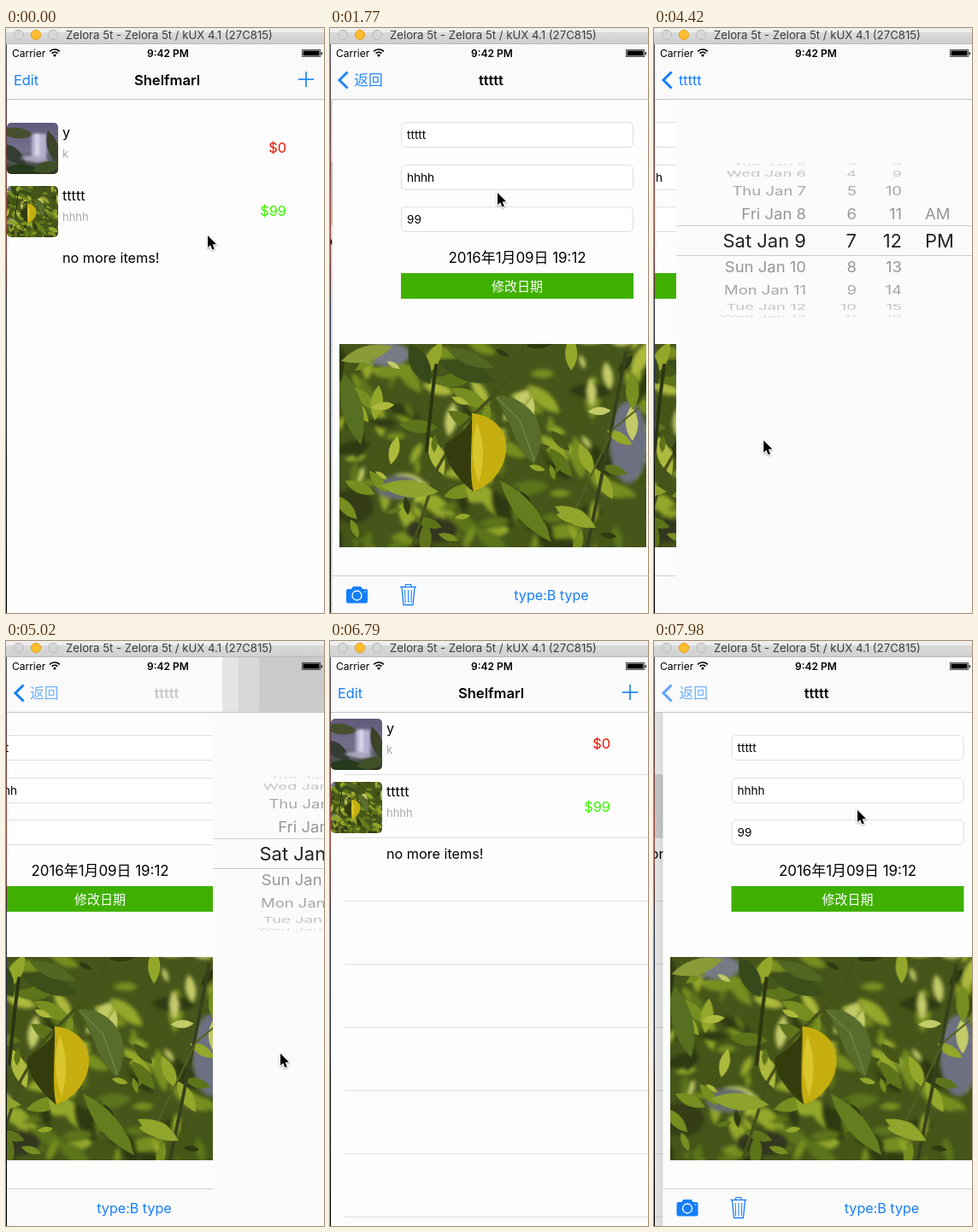
These frames come from a looping animation (372 px wide and 685 px high, 8 s). An HTML page with a canvas:

```html
<!DOCTYPE html>
<html lang="en">
<head>
<meta charset="utf-8">
<title>Item list demo</title>
<style>
html, body { margin: 0; width: 100%; height: 100%; overflow: hidden; background: #fdfdfd; }
canvas { display: block; width: 372px; height: 685px; }
</style>
</head>
<body>
<canvas id="stage" width="372" height="685"></canvas>
<script>
const W = 372, H = 685, LOOP = 8000, SPAN = 371, NAV = 84;
const BLUE = '#157efb', PAPER = '#fdfdfd', LINE = '#dedede';
const FACE = 'Inter, "Noto Sans CJK SC", "Noto Sans CJK JP", "Noto Sans CJK", sans-serif';
const c = document.getElementById('stage').getContext('2d');

// Motion tracks: [step, value, ...], linear in between
const DETAIL = [[9, 371], [10, 110], [11, 18], [12, 2], [13, 0], [42, 0], [43, 50],
  [44, 170], [45, 320], [46, 371], [52, 371], [53, 90], [54, 9.5]];
const PICKER = [[21, 371], [22, 239], [23, 80], [24, 18], [25, 3], [26, 0], [29, 0],
  [31, 50], [34, 241], [35, 241], [36, 290], [37, 345], [38, 366], [39, 371]];
const UNDER = [[21, 0], [22, -41], [23, -87], [24, -106], [25, -111], [29, -111],
  [34, -107], [35, -107], [36, -80], [37, -30], [38, -6], [39, 0]];
const BOUNCE = [[0, 20], [1, 16], [2, 6], [3, 2], [4, 0]];
const SHADE = [[22, 317], [24, 372], [30, 372], [34, 253], [35, 253], [37, 372]];
const POINTER = [[1, 236, 243], [6, 200, 196], [10, 200, 196], [12, 196, 193], [13, 196, 193],
  [17, 268, 299], [18, 266, 302], [22, 266, 302], [27, 80, 483], [29, 80, 483], [34, 321, 483],
  [35, 321, 483], [36, 335, 483], [40, 110, 475], [42, 110, 475], [46, 400, 476],
  [48, 385, 260], [51, 245, 202], [54, 238, 198]];

const clamp = v => Math.max(0, Math.min(1, v));

function at(track, k, i = 1) {
  let a = track[0];
  for (const b of track) {
    if (k <= b[0]) return b === a ? b[i] : a[i] + (b[i] - a[i]) * (k - a[0]) / (b[0] - a[0]);
    a = b;
  }
  return a[i];
}

function rect(x, y, w, h, color) {
  c.fillStyle = color;
  c.fillRect(x, y, w, h);
}

function text(str, x, y, size, color = '#000', align = 'left', weight = 400) {
  c.font = `${weight} ${size}px ${FACE}`;
  c.textAlign = align;
  c.fillStyle = color;
  c.fillText(str, x, y);
}

function stroke(points, color, width, g = c) {
  g.beginPath();
  points.forEach(([x, y], i) => i ? g.lineTo(x, y) : g.moveTo(x, y));
  g.strokeStyle = color;
  g.lineWidth = width;
  g.stroke();
}

function disc(x, y, r, fill, edge) {
  c.beginPath();
  c.arc(x, y, r, 0, 7);
  if (fill) { c.fillStyle = fill; c.fill(); }
  if (edge) { c.strokeStyle = edge; c.stroke(); }
}

function faded(alpha, draw) {
  if (alpha <= 0) return;
  c.save();
  c.globalAlpha *= clamp(alpha);
  draw();
  c.restore();
}

function sheet(w, h) {
  const s = document.createElement('canvas');
  s.width = w;
  s.height = h;
  return s;
}

function leaf(g, x1, y1, x2, y2, bulge, color) {
  const mx = (x1 + x2) / 2, my = (y1 + y2) / 2;
  const len = Math.hypot(x2 - x1, y2 - y1) || 1;
  const nx = -(y2 - y1) / len * bulge, ny = (x2 - x1) / len * bulge;
  g.beginPath();
  g.moveTo(x1, y1);
  g.quadraticCurveTo(mx + nx, my + ny, x2, y2);
  g.quadraticCurveTo(mx - nx, my - ny, x1, y1);
  g.fillStyle = color;
  g.fill();
}

function plantPicture() {
  const s = sheet(359, 238), g = s.getContext('2d');
  let seed = 41;
  const rnd = () => (seed = seed * 16807 % 2147483647) / 2147483647;
  const tones = ['#2f3a12', '#455617', '#5d741b', '#778e20', '#94a72b', '#adb93c', '#c3ca68'];
  g.fillStyle = '#46561a';
  g.fillRect(0, 0, 359, 238);
  const blob = (x, y, rx, ry, color) => {
    g.beginPath();
    g.ellipse(x, y, rx, ry, 0, 0, 7);
    g.fillStyle = color;
    g.fill();
  };
  const scatter = (n, size) => {
    for (let i = 0; i < n; i++) {
      const x = rnd() * 380 - 10, y = rnd() * 250 - 10;
      const a = rnd() * 2.6 - 0.3, len = size * (0.5 + rnd());
      const light = y > 165 ? 5 : 7;
      leaf(g, x, y, x + Math.cos(a) * len, y + Math.sin(a) * len, len * 0.35, tones[rnd() * light | 0]);
    }
  };
  g.filter = 'blur(2px)';
  scatter(170, 36);
  blob(55, 12, 28, 14, '#777b86');
  blob(338, 115, 22, 48, '#6c7080');
  blob(68, 168, 26, 14, '#666b70');
  blob(108, 218, 30, 15, '#33371f');
  blob(15, 190, 25, 20, '#343d16');
  g.filter = 'none';
  scatter(75, 32);

  g.lineCap = 'round';
  stroke([[215, 3], [205, 32], [180, 60], [142, 98], [115, 145], [85, 238]], '#46501a', 3.5, g);
  stroke([[113, 25], [108, 65], [102, 125]], '#2c3512', 4, g);
  stroke([[335, 10], [319, 95], [290, 238]], '#38401c', 4, g);
  stroke([[270, 205], [320, 100], [350, 75]], '#536021', 2, g);

  leaf(g, 5, 34, 25, 118, 24, '#566f20');
  leaf(g, 2, 20, 62, 3, 18, '#8b9b38');
  leaf(g, 82, 0, 106, 47, 22, '#36491a');
  leaf(g, 116, 20, 182, 44, 22, '#3c4f1a');
  leaf(g, 125, 5, 180, 28, 16, '#516722');
  leaf(g, 48, 166, 116, 173, 20, '#8da32d');
  leaf(g, 188, 160, 248, 232, 22, '#647d1e');
  leaf(g, 252, 190, 300, 215, 18, '#91a52d');

  g.beginPath();
  g.moveTo(182, 62);
  g.bezierCurveTo(205, 55, 255, 85, 228, 140);
  g.bezierCurveTo(205, 125, 202, 88, 182, 62);
  g.fillStyle = '#586d2b';
  g.fill();
  stroke([[184, 63], [211, 89], [228, 137]], '#83905a', 1, g);

  g.beginPath();
  g.moveTo(157, 82);
  g.bezierCurveTo(145, 113, 122, 110, 122, 124);
  g.bezierCurveTo(128, 146, 144, 163, 157, 173);
  g.fillStyle = '#343c0e';
  g.fill();
  g.beginPath();
  g.moveTo(155, 81);
  g.bezierCurveTo(188, 85, 201, 110, 193, 136);
  g.bezierCurveTo(186, 157, 170, 168, 157, 173);
  g.bezierCurveTo(151, 150, 156, 110, 155, 81);
  g.fillStyle = '#c6ae10';
  g.fill();
  leaf(g, 161, 91, 163, 163, 12, '#d9c62c');
  return s;
}

function waterfallPicture() {
  const s = sheet(60, 60), g = s.getContext('2d');
  const sky = g.createLinearGradient(0, 0, 0, 60);
  sky.addColorStop(0, '#62597b');
  sky.addColorStop(0.55, '#75718a');
  sky.addColorStop(1, '#28361c');
  g.fillStyle = sky;
  g.fillRect(0, 0, 60, 60);
  leaf(g, -8, 10, 32, 14, 13, '#46502f');
  leaf(g, -10, 25, 22, 48, 16, '#343c33');
  g.filter = 'blur(1.5px)';
  g.fillStyle = '#b5b0cd';
  g.fillRect(29, 13, 17, 30);
  g.fillStyle = '#d9d6e8';
  g.fillRect(33, 13, 5, 32);
  leaf(g, 15, 41, 50, 44, 7, '#aaa6bf');
  g.filter = 'none';
  leaf(g, 48, 9, 60, 49, 13, '#3b4329');
  leaf(g, -5, 56, 42, 59, 19, '#26391b');
  leaf(g, 30, 56, 64, 48, 13, '#405026');
  return s;
}

const plant = plantPicture(), falls = waterfallPicture();

function thumb(img, sx, size, y) {
  c.save();
  c.beginPath();
  c.roundRect(1, y, 60, 60, 5);
  c.clip();
  c.drawImage(img, sx, 0, size, size, 1, y, 60, 60);
  c.restore();
}

function drawList(k, shift) {
  const dy = Math.round(at(BOUNCE, k));
  c.save();
  c.translate(shift, dy);
  rect(0, NAV - dy, 500, H, PAPER);
  const lit = k >= 8 && k < 46 ? clamp((46 - k) / 4) : k >= 52 ? 1 : 0;
  faded(lit, () => rect(0, 157, 500, 74, '#d9d9d9'));
  if (k > 0) for (let y = 156; y < H; y += 74) rect(17, y, 400, 1, LINE);
  const row = (y, name, note, price, color) => {
    text(name, 66, y + 25, 16.2);
    text(note, 66, y + 49, 13, '#aaa');
    text(price, 328, y + 43, 16.4, color, 'right');
  };
  thumb(falls, 0, 60, 91);
  thumb(plant, 60, 238, 165);
  row(83, 'y', 'k', '$0', '#f01000');
  row(157, 'ttttt', 'hhhh', '$99', '#3cf500');
  text('no more items!', 66, 255, 16.2);
  c.restore();
}

function drawCamera() {
  c.fillStyle = BLUE;
  c.beginPath();
  c.roundRect(17, 657, 25, 16.5, 2);
  c.fill();
  c.beginPath();
  c.moveTo(22, 658);
  c.lineTo(25, 654);
  c.lineTo(34, 654);
  c.lineTo(37, 658);
  c.fill();
  c.lineWidth = 1.3;
  disc(29.5, 664.5, 5.5, null, '#fff');
  disc(39, 660, 0.8, '#fff');
}

function drawTrash() {
  stroke([[80, 654.5], [99, 654.5]], BLUE, 1.3);
  stroke([[86, 654], [86.5, 651.5], [92.5, 651.5], [93, 654]], BLUE, 1.2);
  stroke([[82, 655], [84, 675.5], [95, 675.5], [97, 655]], BLUE, 1.3);
  for (const d of [-3.5, 0, 3.5]) stroke([[89.5 + d * 1.1, 658], [89.5 + d, 673]], BLUE, 1);
}

function drawDetail(k, shift) {
  c.save();
  c.translate(shift, 0);
  rect(1, NAV, 490, H, PAPER);
  [[110, 'ttttt'], [160, 'hhhh'], [209, '99']].forEach(([y, value]) => {
    c.beginPath();
    c.roundRect(81.5, y + 0.5, 271, 29, 5);
    c.fillStyle = '#fff';
    c.fill();
    c.strokeStyle = LINE;
    c.lineWidth = 1;
    c.stroke();
    text(value, 88, y + 20, 13.6);
  });
  text('2016年1月09日 19:12', 217, 275, 16.9, '#000', 'center');
  rect(81, 287, 272, 30, '#40b000');
  const pressed = k >= 20 && k < 30;
  text('修改日期', 217, 308, 15, pressed ? '#79c150' : '#fff', 'center');
  c.drawImage(plant, 9, 370);
  rect(1, 641, 490, 44, '#fbfbfb');
  rect(1, 641, 490, 1, '#cfcfcf');
  drawCamera();
  drawTrash();
  text('type:B type', 257, 670, 16.1, BLUE, 'center');
  c.restore();
}

function wheel(x, align, label) {
  const tints = ['#222', '#969696', '#a6a6a6', '#c4c4c4', '#dcdcdc'];
  for (let i = -4; i <= 4; i++) {
    const angle = i * 0.35;
    c.save();
    c.translate(x, 249 + 90 * Math.sin(angle));
    c.scale(1, Math.cos(angle));
    const size = i ? 18.5 : 22;
    text(label(i), 0, size * 0.36, size, tints[Math.abs(i)], align);
    c.restore();
  }
}

function drawPicker(shift) {
  const days = ['Sun', 'Mon', 'Tue', 'Wed', 'Thu', 'Fri', 'Sat'];
  c.save();
  c.translate(shift, 0);
  rect(1, NAV, 490, H, '#fbfbfb');
  wheel(153, 'right', i => days[(i + 13) % 7] + ' Jan ' + (9 + i));
  wheel(212, 'right', i => String(7 + i));
  wheel(265, 'right', i => String(12 + i));
  wheel(292, 'left', i => i === 0 ? 'PM' : i === -1 ? 'AM' : '');
  rect(1, 231, 490, 1, '#cdcdcd');
  rect(1, 266, 490, 1, '#cdcdcd');
  c.restore();
}

function edgeShadow(x, depth) {
  if (x <= 1 || x >= W) return;
  const g = c.createLinearGradient(x - 9, 0, x, 0);
  g.addColorStop(0, 'rgba(0,0,0,0)');
  g.addColorStop(1, `rgba(0,0,0,${depth})`);
  rect(x - 9, NAV, 9, H, g);
}

function chevron() {
  stroke([[20.5, 51.5], [11, 61], [20.5, 70.5]], BLUE, 3);
}

function drawNav(k, off, pick) {
  rect(1, 19, W, 64, '#fafafa');
  const shade = at(SHADE, k);
  if (k >= 22 && k < 38 && shade < W) {
    rect(shade, 19, W, 64, '#e4e4e4');
    rect(shade + 19, 19, W, 64, '#d8d8d8');
    rect(shade + 43, 19, W, 64, '#cacaca');
  }
  rect(1, 83, W, 1, '#c4c4c4');

  const p = 1 - off / SPAN, q = 1 - pick / SPAN, back = k >= 30;
  faded(1 - p * 1.6, () => {
    text('Edit', 9, 67, 16.3, BLUE);
    text('Shelfmarl', 188.5 - p * 100, 67, 16.6, '#000', 'center', 600);
    rect(342, 59.3, 18, 1.6, BLUE);
    rect(350.2, 51, 1.6, 18, BLUE);
  });
  if (p <= 0) return;
  if (q <= 0) {
    faded(1 - off / 24, () => text('返回', 28 + off * 0.15, 67, 16.8, BLUE));
    faded(1 - off / 30, chevron);
    faded(1 - off / 200, () => text('ttttt', 188 + off * 0.22, 67, 16.6, '#000', 'center', 600));
    return;
  }
  chevron();
  if (back) {
    const r = clamp((k - 30) / 4);
    const done = clamp((k - 35) / 4);
    faded(0.6 * r + 0.4 * done, () => text('返回', 28, 67, 16.8, BLUE));
    faded(0.2 * r + 0.8 * done, () => text('ttttt', 188, 67, 16.6, '#000', 'center', 600));
    faded(1 - r * 1.4, () => text('ttttt', 29, 67, 16.3, BLUE));
  } else {
    faded(1 - q * 1.8, () => text('返回', 28 - q * 42, 67, 16.8, BLUE));
    const x = 188 - q * 143 + 25 * clamp(q * 2 - 1) * 0;
    faded(1 - q * 1.35, () => text('ttttt', x, 67, 16.6, '#22355c', 'center', 600));
    faded(q * 1.1 - 0.1, () => text('ttttt', x, 67, 16.3, BLUE, 'center'));
  }
}

function drawStatus() {
  text('Carrier', 7, 33.5, 12);
  c.lineWidth = 1.7;
  for (const r of [4.6, 8]) {
    c.beginPath();
    c.arc(57, 33, r, -Math.PI * 0.76, -Math.PI * 0.24);
    c.strokeStyle = '#000';
    c.stroke();
  }
  disc(57, 32, 1.6, '#000');
  text('9:42 PM', 189.5, 33.5, 12, '#000', 'center', 600);
  c.lineWidth = 0.8;
  c.strokeStyle = '#333';
  c.strokeRect(346.4, 25.4, 21.2, 8.2);
  rect(347.5, 26.5, 19, 6, '#000');
  rect(368.5, 28, 1.5, 3.5, '#222');
}

function drawFrame() {
  const bar = c.createLinearGradient(0, 0, 0, 19);
  bar.addColorStop(0, '#dedede');
  bar.addColorStop(1, '#cfcfcf');
  rect(0, 0, W, 19, bar);
  rect(0, 0, W, 5, '#eeeeee');
  rect(0, 18, W, 1, '#b9b9b9');
  c.lineWidth = 1;
  disc(15, 8, 5.6, '#d6d6d6', '#b9b9b9');
  disc(35, 8, 5.6, '#fdbd2e', '#dfa023');
  disc(55, 8, 5.6, '#d6d6d6', '#b9b9b9');
  text('Zelora 5t - Zelora 5t / kUX 4.1 (27C815)', 70, 13, 13.2, '#3c3c3c');
  const side = c.createLinearGradient(0, 19, 0, H);
  [[0, '#4a4a55'], [0.15, '#59353a'], [0.3, '#a14a3c'], [0.42, '#5a2a2c'],
    [0.46, '#2b3350'], [0.68, '#20263c'], [0.74, '#0a0a0c'], [1, '#000']]
    .forEach(([s, col]) => side.addColorStop(s, col));
  rect(0, 19, 1, H, side);
}

function drawPointer(x, y) {
  c.save();
  c.translate(x, y);
  c.beginPath();
  [[0, 0], [0, 14], [3.2, 11.2], [5.4, 16.4], [7.8, 15.4], [5.6, 10.4], [10, 10]]
    .forEach(([px, py]) => c.lineTo(px, py));
  c.closePath();
  c.lineJoin = 'round';
  c.strokeStyle = '#fff';
  c.lineWidth = 2.2;
  c.shadowColor = 'rgba(0,0,0,.35)';
  c.shadowBlur = 2;
  c.shadowOffsetY = 1;
  c.stroke();
  c.shadowColor = 'transparent';
  c.fillStyle = '#000';
  c.fill();
  c.restore();
}

function draw(t) {
  const k = Math.floor((t + 10) / 147.6);
  const off = at(DETAIL, k), pick = at(PICKER, k);
  rect(0, 0, W, H, PAPER);
  c.save();
  c.beginPath();
  c.rect(1, NAV, W, H);
  c.clip();
  if (off > 0) {
    drawList(k, -111 * (1 - off / SPAN));
    if (off < SPAN) {
      rect(0, NAV, W, H, `rgba(0,0,0,${0.1 * (1 - off / SPAN)})`);
      edgeShadow(1 + off, 0.06);
    }
  }
  if (off < SPAN) drawDetail(k, off + at(UNDER, k));
  if (pick < SPAN) {
    if (k < 30) rect(0, NAV, W, H, `rgba(0,0,0,${0.06 * (1 - pick / SPAN)})`);
    if (k < 30) edgeShadow(1 + pick, 0.1);
    drawPicker(pick);
  }
  c.restore();
  drawNav(k, off, pick);
  drawStatus();
  drawFrame();
  drawPointer(at(POINTER, k), at(POINTER, k, 2));
}

const start = performance.now();
function tick() {
  draw((performance.now() - start) % LOOP);
  requestAnimationFrame(tick);
}
tick();
</script>
</body>
</html>
```
